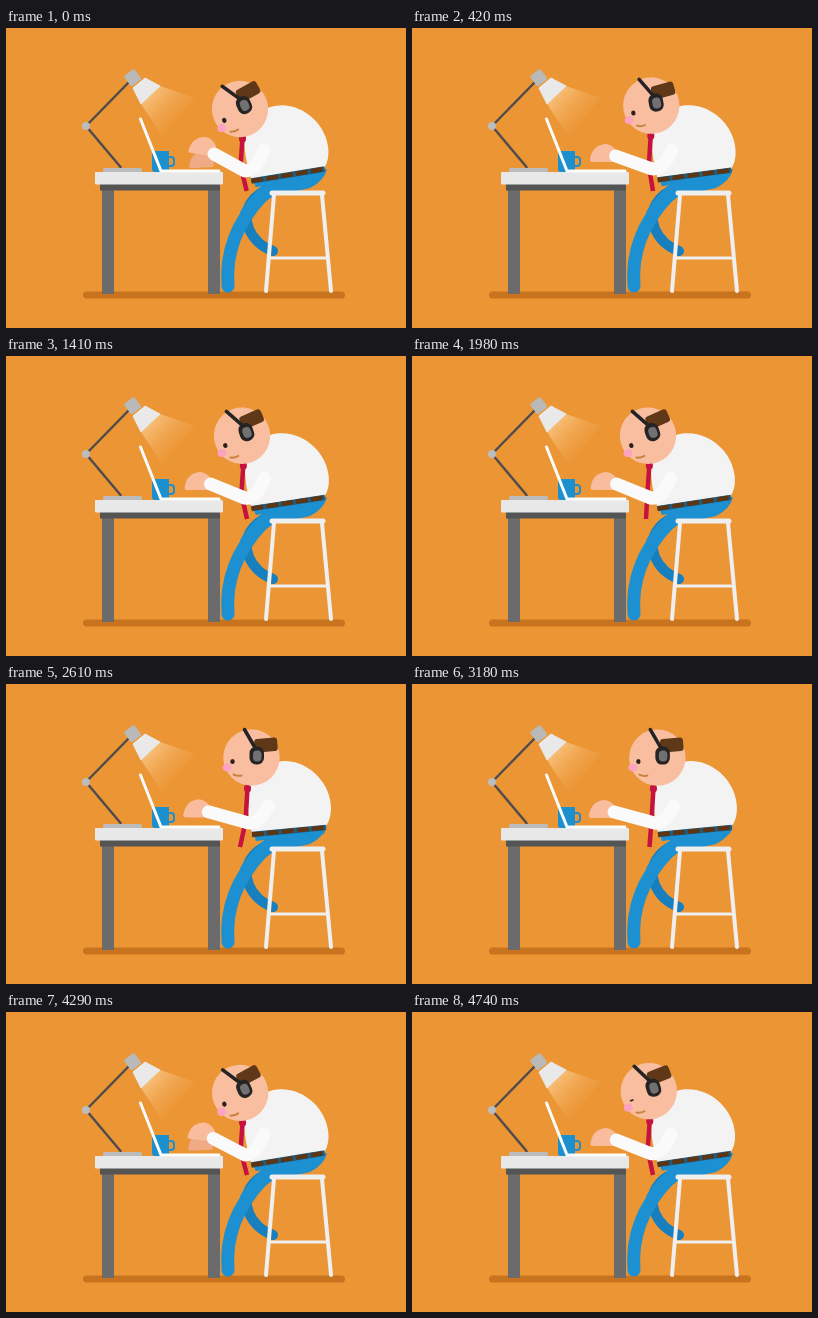
An HTML page that plays this animation: 400x300 px, repeating every 4.77 s.

```html
<!DOCTYPE html>
<html lang="en">
<head>
<meta charset="utf-8">
<title>Typing at the desk</title>
<style>
  html, body { margin: 0; height: 100%; overflow: hidden; background: #eb9534; }
  svg { display: block; width: 100vw; height: 100vh; }
  .line { fill: none; stroke-linecap: round; stroke-linejoin: round; }
</style>
</head>
<body>
<svg viewBox="0 0 400 300">
  <defs>
    <linearGradient id="beam" gradientUnits="userSpaceOnUse" x1="143" y1="67" x2="172" y2="95">
      <stop offset="0" stop-color="#ffd9a4" stop-opacity=".6"/>
      <stop offset="1" stop-color="#f6b465" stop-opacity=".05"/>
    </linearGradient>
  </defs>
  <rect width="400" height="300" fill="#eb9534"/>
  <rect x="77" y="263.5" width="262" height="7" rx="3.5" fill="#c8741f"/>

  <!-- lamp -->
  <path d="M135 76L154 58L189 70L157 110Z" fill="url(#beam)"/>
  <path class="line" d="M114.5 139L80 98L126 51" stroke="#504c4c" stroke-width="2.5"/>
  <circle cx="80" cy="98" r="4" fill="#bcbcbc"/>
  <path d="M97 144V142Q97 140 99 140H134Q136 140 136 142V144Z" fill="#bcbcbc"/>
  <rect x="120.5" y="43" width="13" height="13" rx="2" fill="#b9b9b9" transform="rotate(-38 127 50)"/>
  <path d="M127 60L139 50L154 58L135 76Z" fill="#e9e9e9" stroke="#e9e9e9" stroke-linejoin="round"/>

  <!-- desk -->
  <path d="M96 156H108V266H96ZM202 156H214V266H202Z" fill="#6b6b6b"/>
  <rect x="94" y="156" width="120" height="6.5" fill="#545454"/>
  <rect x="89" y="144" width="128" height="12.5" rx="1" fill="#e8e8e8"/>
  <path d="M146 123H163V141Q163 144 160 144H149Q146 144 146 141Z" fill="#1c8fcf"/>
  <path class="line" d="M163 129H165Q168 129 168 132V135Q168 138 165 138H163" stroke="#1c8fcf" stroke-width="2"/>
  <path class="line" d="M134.5 91L155 143H213" stroke="#fcfcfc" stroke-width="3"/>

  <!-- legs -->
  <path class="line" d="M270 157Q232 172 243 201Q250 217 267 223" stroke="#177fbd" stroke-width="10"/>
  <path class="line" d="M222 258Q218 208 256 168" stroke="#1c90d0" stroke-width="13"/>
  <path d="M234 184Q246 164 264 152L321 141Q318 153 304 160Q292 163 274 165Q256 172 243 192Z" fill="#1c90d0"/>

  <path id="farHand" d="M179 131Q181 117 195 116Q201 117 205 124L203 133H182Q179 133 179 131Z" fill="#efaa86"/>

  <g id="torso">
    <path d="M247 148L320 143L318 150L250 157Z" fill="#1c90d0"/>
    <path d="M242 103C251 86 264 76 280 77C305 78 325 101 325 124Q325 135 320 142L246 149Q240 125 242 103Z" fill="#f3f3f3"/>
    <path d="M246 150.5L320 143.5" fill="none" stroke="#1b5f86" stroke-width="5.5"/>
    <path d="M246 150.5L320 143.5" fill="none" stroke="#5c3515" stroke-width="4.5" stroke-dasharray="12 3"/>
  </g>
  <path id="tie" fill="none" stroke="#c5123f" stroke-width="4.5" stroke-linejoin="round"/>
  <path id="knot" fill="none" stroke="#c5123f" stroke-width="7" stroke-linecap="round"/>
  <path id="nearHand" d="M179 132Q181 117 195 116Q202 117 206 124L203 134H182Q179 134 179 132Z" fill="#f9bc9c"/>
  <path id="arm" class="line" stroke="#fafafa" stroke-width="13"/>

  <g id="head">
    <circle r="28.2" fill="#f9bea0"/>
    <rect x="4" y="-18" width="23" height="13.5" rx="3" fill="#5f3817" transform="rotate(-5)"/>
    <ellipse id="eye" cx="-19" cy="4" rx="2.2" ry="2.5" fill="#2b211e"/>
    <ellipse cx="-24.5" cy="10" rx="4.5" ry="4" fill="#fba3c0"/>
    <path class="line" d="M-18 17Q-14 19 -10 18" stroke="#c98340" stroke-width="2"/>
    <path class="line" d="M-7 -28L4 -9" stroke="#252323" stroke-width="3.5"/>
    <rect x="-2" y="-11" width="14.5" height="18" rx="6.5" fill="#252323"/>
    <rect x="1.5" y="-7" width="8.5" height="11" rx="4" fill="#717171"/>
  </g>

  <!-- stool -->
  <g class="line" stroke="#efefef">
    <path d="M264 230H321" stroke-width="3"/>
    <path d="M268 167L260 263M316 167L325 263" stroke-width="4"/>
    <path d="M266 165H317" stroke-width="5"/>
  </g>
</svg>
<script>
const LOOP = 4770, BEAT = LOOP / 10, KEY = BEAT / 4;
const part = id => document.getElementById(id);
const set = (id, name, value) => part(id).setAttribute(name, value);
const mix = (a, b, k) => a + (b - a) * k;
const ramp = (t, from, to) => Math.min(1, Math.max(0, (t - from) / (to - from)));
const smooth = k => k * k * (3 - 2 * k);

function draw(now) {
  const t = now % LOOP, beat = t % BEAT;
  // He leans back after each beat and drops forward onto the next one
  const lean = smooth(ramp(beat, 20, 220)) * (1 - ramp(beat, 310, BEAT) ** 1.5);
  const swing = Math.max(ramp(beat, 230, 410), 1 - ramp(beat, 0, 25));
  const tap = 1.4 * Math.max(0, Math.cos((t - 12) / KEY * 2 * Math.PI)) ** 2;

  set('torso', 'transform', `translate(${mix(-1, 0, lean)} 0) rotate(${mix(-4, 0, lean)} 283 146)`);
  set('head', 'transform', `translate(${mix(234, 245.5, lean)} ${mix(81, 73.5, lean)}) rotate(${-24 * (1 - lean) ** 1.3})`);
  set('eye', 'ry', t > 4680 ? .8 : 2.5);

  const x = mix(236.5, 241.5, lean), y = mix(110, 104, lean), end = mix(234, 241, swing);
  set('knot', 'd', `M${x} ${y}v1`);
  set('tie', 'd', `M${x} ${y}L${x - 2} 138L${end} 163`);

  const wrist = mix(205, 202, lean) + 3 * tap;
  set('arm', 'd', `M${mix(258, 262, lean)} 122Q${mix(250, 252, lean)} 143 239 ${mix(143, 138, lean)}L${wrist} ${128 - 2 * tap}`);
  const shift = -2 * lean;
  set('nearHand', 'transform', `translate(${shift + 4 * tap} ${-6 * tap}) rotate(${8 * tap} 204 126)`);
  set('farHand', 'transform', `translate(${shift + 4 * tap} ${6 * tap}) rotate(${-4 * tap} 204 128)`);
}

const start = performance.now();
function frame() {
  draw(performance.now() - start);
  requestAnimationFrame(frame);
}
frame();
</script>
</body>
</html>
```
